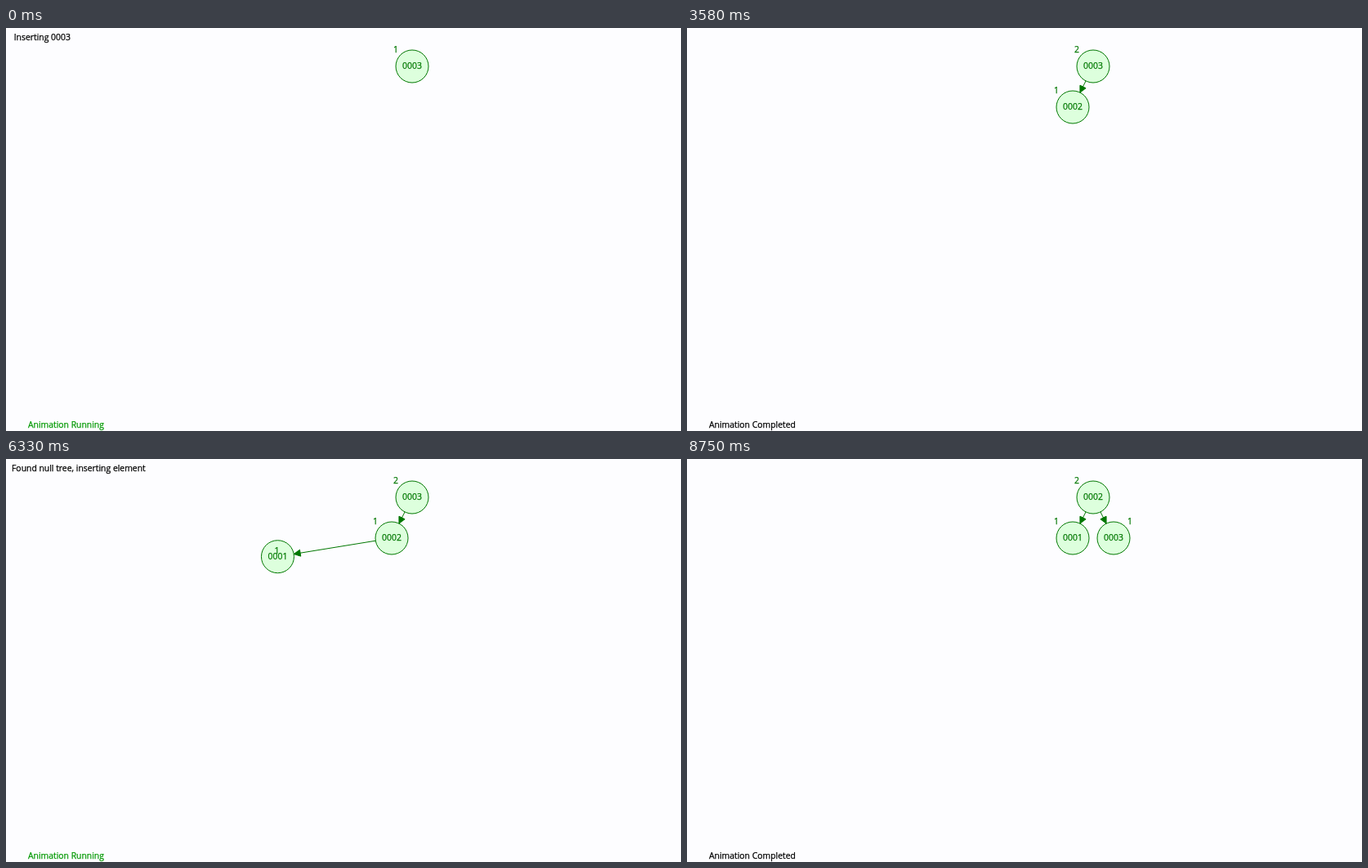
These frames come from a looping animation (826 by 494 pixels, 9760 ms). An HTML page with a canvas:

```html
<!DOCTYPE html>
<html lang="en">
<head>
<meta charset="utf-8">
<title>AVL tree insertion</title>
<style>
  html, body { margin: 0; width: 100%; height: 100%; overflow: hidden; background: #fdfdff; }
  canvas { display: block; width: 826px; height: 494px; }
</style>
</head>
<body>
<canvas id="stage" width="826" height="494"></canvas>
<script>
const ctx = document.getElementById('stage').getContext('2d');

const LOOP = 9760;
const SAMPLE = 250 / 3;      // the picture refreshes twelve times a second
const TICK = 30.9;           // one animation tick, ms
const TICKS = 12;            // ticks per step
const GREEN = '#007700', RED = '#ff0000', FILL = '#ddffdd';

const ROOT = [497, 47], LEFT = [472, 97], LEFT2 = [447, 147], RIGHT = [522, 97];
const START = [27, 47], TAG_START = [77, 77];

const mix = (a, b, p) => a.map((v, i) => v + (b[i] - v) * p);
const tagOf = ([x, y], side = -1) => [x + 20 * side, y - 20];

// A tree node with its height tag
const node = (name, pos, height = '', more = {}) =>
  ({ name, pos, height, tag: tagOf(pos), ...more });
const flying = (name, to, p) =>
  node(name, mix(START, to, p), '1', { tag: mix(TAG_START, tagOf(to), p) });

const hot = { hot: true }, red = { red: true };
const less = (a, b) => `${a} < ${b}.  Looking at left subtree`;
const FOUND = 'Found null tree, inserting element';
const UNWIND = 'Unwinding Recursion';
const ADJUST = 'Adjusting height after recursive call';
const ROTATE = 'Single Rotate Right';

const scene = (msg, nodes, links = [], more = {}) => ({ msg, nodes, links, ...more });

const only = msg => scene(msg, [node('0003', ROOT, '1')]);
const pair = (msg, h3, h2, extra = [], more = {}, m3 = {}, m2 = {}) =>
  scene(msg, [node('0003', ROOT, h3, m3), node('0002', LEFT, h2, m2), ...extra], [[0, 1]], more);
const chain = (msg, h3, h2, more = {}, m3 = {}, m2 = {}, third = node('0001', LEFT2, '1')) => {
  const s = pair(msg, h3, h2, [third], more, m3, m2);
  s.links.push([1, 2]);
  return s;
};
const rotated = (msg, p) => scene(msg, [
  node('0002', mix(LEFT, ROOT, p), '2'),
  node('0001', mix(LEFT2, LEFT, p), '1'),
  node('0003', mix(ROOT, RIGHT, p), '1', { tag: mix(tagOf(ROOT), tagOf(RIGHT, 1), p) })
], [[0, 1], [0, 2]]);

const insertTwo = [
  () => scene(' Inserting 0002', [node('0003', ROOT, '1'), node('0002', START)]),
  () => scene(less('0002', '0003'), [node('0003', ROOT, '1', hot), node('0002', START, '', hot)]),
  p => scene(FOUND, [node('0003', ROOT, '1'), flying('0002', LEFT, p)], [[0, 1]]),
  p => pair(UNWIND, '1', '1', [], { ring: mix(LEFT, ROOT, p) }),
  () => pair(ADJUST, '2', '1', [], {}, red)
];

const one = more => [node('0001', START, '', more)];
const insertOne = [
  () => pair(' Inserting 0001', '2', '1', one()),
  () => pair(less('0001', '0003'), '2', '1', one(hot), {}, hot),
  p => pair(less('0001', '0003'), '2', '1', one(), { ring: mix(ROOT, LEFT, p) }),
  () => pair(less('0001', '0002'), '2', '1', one(hot), {}, {}, hot),
  p => chain(FOUND, '2', '1', {}, {}, {}, flying('0001', LEFT2, p)),
  p => chain(UNWIND, '2', '1', { ring: mix(LEFT2, LEFT, p) }),
  () => chain(ADJUST, '2', '2', {}, {}, red),
  p => chain(UNWIND, '2', '2', { ring: mix(LEFT, ROOT, p) }),
  () => chain(ADJUST, '3', '2', {}, red),
  () => chain(ROTATE, '3', '2', { hotLink: 0 }),
  p => rotated(ROTATE, p)
];

// Width of the red highlight, a triangle wave between 3 and 7
const pulse = n => 7 - Math.abs(((n - 7) % 56 + 56) % 56 - 28) / 7;

function play(steps, age, offset) {
  const n = Math.floor(age / TICK);
  const s = steps[Math.floor(n / TICKS)]((n % TICKS) / (TICKS - 1));
  s.glow = pulse(n + offset);
  return s;
}

const lasts = steps => steps.length * TICKS * TICK;

function sceneAt(t) {
  const a = t - 1677, b = t - 4595;
  if (t < 249) return only(' Inserting 0003');
  if (a < 0) return only('');
  if (a < lasts(insertTwo)) return play(insertTwo, a, -60);
  if (b < 0) return pair('', '2', '1');
  if (b < lasts(insertOne)) return play(insertOne, b, 0);
  return rotated('', 1);
}

// A hairline outline gives the small type its weight
function text(str, x, y, color, align = 'center') {
  ctx.fillStyle = ctx.strokeStyle = color;
  ctx.textAlign = align;
  ctx.lineWidth = 0.25;
  ctx.fillText(str, x, y + 3);
  ctx.strokeText(str, x, y + 3);
}

function circle([x, y], r) {
  ctx.beginPath();
  ctx.arc(x, y, r, 0, Math.PI * 2);
}

function drawNode({ name, pos, hot }, glow) {
  if (hot) {
    circle(pos, 20 + glow);
    ctx.fillStyle = RED;
    ctx.fill();
  }
  circle(pos, 20);
  ctx.fillStyle = FILL;
  ctx.fill();
  ctx.lineWidth = 1;
  ctx.strokeStyle = GREEN;
  ctx.stroke();
  text(name, ...pos, GREEN);
}

function drawLink(a, b, width, color) {
  const len = Math.hypot(a[0] - b[0], a[1] - b[1]);
  if (len <= 40) return;
  const ux = (a[0] - b[0]) / len, uy = (a[1] - b[1]) / len;
  const x = b[0] + ux * 20, y = b[1] + uy * 20;
  ctx.lineWidth = width;
  ctx.strokeStyle = ctx.fillStyle = color;
  ctx.beginPath();
  ctx.moveTo(a[0] - ux * 20, a[1] - uy * 20);
  ctx.lineTo(x, y);
  ctx.stroke();
  ctx.beginPath();
  ctx.moveTo(x, y);
  ctx.lineTo(x + ux * 8 - uy * 4, y + uy * 8 + ux * 4);
  ctx.lineTo(x + ux * 8 + uy * 4, y + uy * 8 - ux * 4);
  ctx.closePath();
  ctx.stroke();
  ctx.fill();
}

function draw(s) {
  ctx.fillStyle = '#fdfdff';
  ctx.fillRect(0, 0, 826, 494);
  ctx.font = '10.4px "Open Sans", "Noto Sans", sans-serif';

  s.nodes.forEach(n => drawNode(n, s.glow));
  s.nodes.forEach(n => text(n.height, ...n.tag, n.red ? RED : GREEN));
  if (s.ring) {
    circle(s.ring, 20);
    ctx.lineWidth = 4;
    ctx.strokeStyle = GREEN;
    ctx.stroke();
  }
  s.links.forEach(([i, j], k) => {
    const a = s.nodes[i].pos, b = s.nodes[j].pos;
    if (k === s.hotLink) drawLink(a, b, s.glow, RED);
    drawLink(a, b, 1, GREEN);
  });

  text(s.msg, 7, 12, '#000', 'left');
  if (s.msg) text('Animation Running', 27, 487, '#009900', 'left');
  else text('Animation Completed', 27, 487, '#000', 'left');
}

const t0 = performance.now();
function frame() {
  const t = (performance.now() - t0) % LOOP;
  draw(sceneAt(Math.floor((t + 4) / SAMPLE) * SAMPLE));
  requestAnimationFrame(frame);
}
frame();
</script>
</body>
</html>
```
